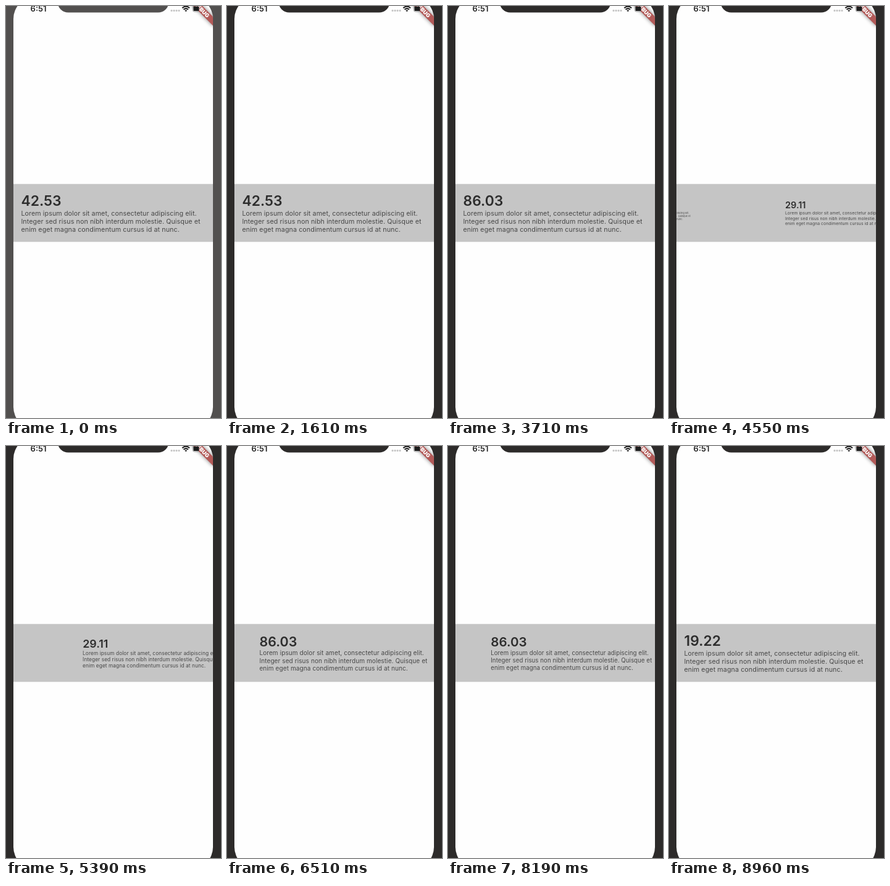
These frames come from a looping animation (348x666 px, 9870 ms). An HTML page:

```html
<!DOCTYPE html>
<html lang="en">
<head>
<meta charset="utf-8">
<title>Scaling pages</title>
<style>
  html, body { margin: 0; width: 100%; height: 100%; overflow: hidden; }
  svg { display: block; width: 100%; height: 100%; }
  text { font-family: Inter, "Open Sans", sans-serif; }
  .value { font-size: 22.9px; font-weight: 600; fill: #2d2d2d; }
  .body { font-size: 10.7px; letter-spacing: .095px; fill: #484848; }
  .clock { font-size: 13px; font-weight: 600; fill: #232323; }
  .tag { font-size: 8.8px; font-weight: 900; fill: #fff; text-anchor: middle; }
</style>
</head>
<body>
<svg viewBox="0 0 348 666" preserveAspectRatio="xMidYMid meet">
  <defs>
    <clipPath id="screen"><rect x="12" y="-15.2" width="323" height="699.4" rx="36"/></clipPath>
    <filter id="soft" x="-20%" y="-150%" width="140%" height="400%">
      <feGaussianBlur stdDeviation="3.2"/>
    </filter>
  </defs>
  <rect id="bezel" width="348" height="666"/>
  <g clip-path="url(#screen)">
    <rect x="12" y="-16" width="323" height="701" fill="#fefefe"/>
    <rect x="12" y="287.7" width="323" height="93.6" fill="#c5c5c5"/>
    <g id="pages"></g>
    <g transform="translate(335 -15.2) rotate(45)">
      <rect x="-34.4" y="22.9" width="68.8" height="10.3" opacity=".5" filter="url(#soft)"/>
      <rect x="-34.4" y="22.9" width="68.8" height="10.3" fill="#b35a58"/>
      <text class="tag" x="2.5" y="31.2">DEBUG</text>
    </g>
    <text class="clock" x="39.6" y="9">6:51</text>
    <g fill="#c6c6c6">
      <rect x="266.5" y="6" width="3" height="3" rx="1"/>
      <rect x="270.5" y="6" width="3" height="3" rx="1"/>
      <rect x="274.5" y="6" width="3" height="3" rx="1"/>
      <rect x="278.5" y="6" width="3" height="3" rx="1"/>
    </g>
    <g fill="none" stroke="#1c1c1c" stroke-width="2">
      <path d="M285.3 3.2Q291.2 -2 297.1 3.2M287.5 5.7Q291.2 2.5 294.9 5.7"/>
      <path d="M289.2 7.2Q291.2 5.6 293.2 7.2L291.2 9.3Z" fill="#1c1c1c" stroke="none"/>
    </g>
    <path d="M312 -.3H304.700Q302.300 -.3 302.300 2.100V6.700Q302.300 9.100 304.700 9.100H312" fill="none" stroke="#8a8a8a" stroke-width=".8"/>
    <rect x="303.4" y=".8" width="9" height="7.2" rx="1" fill="#1c1c1c"/>
  </g>
  <rect id="notch" x="83.5" y="-30" width="180" height="40.6" rx="17.2"/>
</svg>
<script>
const LOOP = 9870, STEP = 70;
const CENTER = { x: 173.5, y: 334.5 }, PAGE = 299;
const VALUES = ["42.53", "19.22", "86.03", "29.11"];
const LINES = [
  "Lorem ipsum dolor sit amet, consectetur adipiscing elit.",
  "Integer sed risus non nibh interdum molestie. Quisque et",
  "enim eget magna condimentum cursus id at nunc."
];
// Swipes: start time, steps, page reached, progress of the first step
const SWIPES = [
  [1820, 5, 1, .1], [3150, 6, 2, .0625], [4410, 5, 3, .1], [5390, 5, 2, .2225],
  [6510, 6, 1, .0625], [7210, 5, 2, .06], [8190, 5, 1, .1]
];

const byId = id => document.getElementById(id);

function add(parent, name, attrs, text = "") {
  const el = document.createElementNS("http://www.w3.org/2000/svg", name);
  for (const key in attrs) el.setAttribute(key, attrs[key]);
  el.textContent = text;
  return parent.appendChild(el);
}

const pages = VALUES.map(value => {
  const page = add(byId("pages"), "g", {});
  add(page, "text", { class: "value", x: 24.5, y: 323 }, value);
  LINES.forEach((line, i) =>
    add(page, "text", { class: "body", x: 24.4, y: 338.7 + i * 13.2 }, line));
  return page;
});

const ease = u => Math.sin(u * Math.PI / 2) ** 1.5;

function positionAt(t) {
  let pos = 0;
  for (const [start, steps, to, first] of SWIPES) {
    if (t < start) break;
    const k = Math.min(Math.floor((t - start) / STEP), steps - 1);
    pos += (to - pos) * (first + (1 - first) * ease(k / (steps - 1)));
  }
  return pos;
}

function draw(t) {
  const dark = t < 1330 ? "#52504f" : t < 1400 ? "#3c3a39" : "#2d2b2a";
  byId("bezel").setAttribute("fill", dark);
  byId("notch").setAttribute("fill", dark);

  const pos = positionAt(t);
  pages.forEach((page, i) => {
    const off = i - pos, scale = 1 - Math.abs(off);
    page.setAttribute("display", scale > .001 ? "inline" : "none");
    page.setAttribute("transform",
      `translate(${CENTER.x + off * PAGE} ${CENTER.y}) scale(${Math.max(scale, 0)}) ` +
      `translate(${-CENTER.x} ${-CENTER.y})`);
  });
}

function tick() {
  draw((performance.now() + .01) % LOOP);
  requestAnimationFrame(tick);
}
tick();
</script>
</body>
</html>
```
